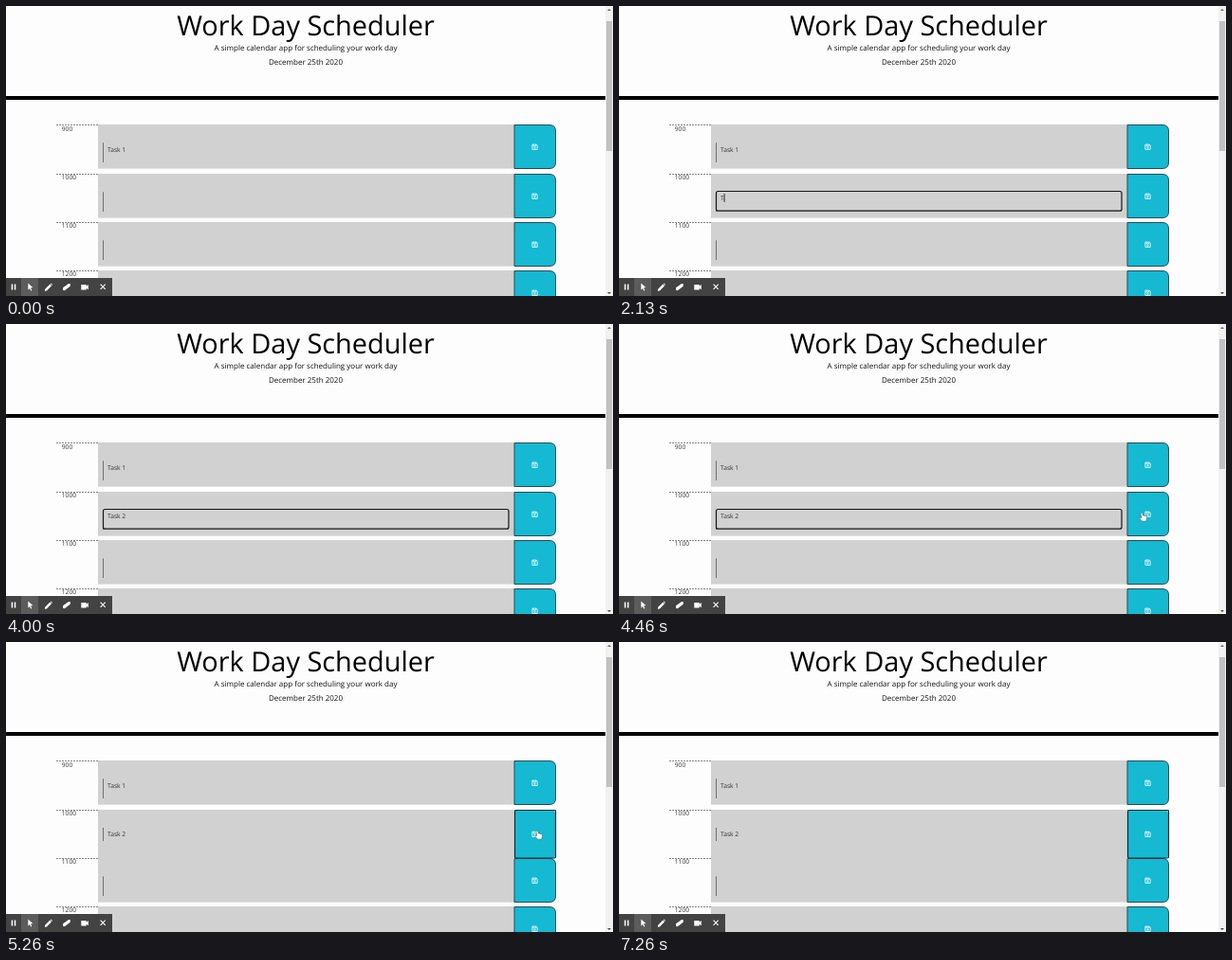
These frames come from a looping animation (640x306 px, 8 s). An HTML page:

```html
<!DOCTYPE html>
<html lang="en">
<head>
<meta charset="utf-8">
<title>Work Day Scheduler</title>
<style>
html, body { margin: 0; width: 100%; height: 100%; overflow: hidden; background: #fdfdfd; }
svg { position: absolute; left: 0; top: 0; display: block; }
text, .entry { font-family: "Open Sans", "Noto Sans", sans-serif; text-rendering: geometricPrecision; }
.small { font-size: 6.7px; fill: #333; }
.line { stroke: #707070; }

/* every animation shares one 8 s clock */
.anim { animation: 8s step-end infinite; }
.entry {
  position: absolute; left: 107px; top: 197px; height: 12px;
  box-sizing: content-box; overflow: hidden; white-space: pre;
  font-size: 6.7px; line-height: 12px; color: #333;
}
.entry { animation-name: type; }
.caret {
  position: absolute; left: 107px; top: 198px; width: 1px; height: 9px;
  background: #333; animation-name: caret-move, blink;
  animation-duration: 8s; animation-timing-function: step-end; animation-iteration-count: infinite;
}
.field { animation-name: field; }
.idle { animation-name: idle; }
.saved { animation-name: saved; }
.tap1 { animation-name: tap1; }
.tap2 { animation-name: tap2; }
.hand { animation-name: hand-show; }
.hand-path { animation: hand-move 8s linear infinite; }

@keyframes type {
  0% { width: 0; }
  26.625% { width: 3.7px; }
  28.25% { width: 7.1px; }
  30% { width: 10.3px; }
  31.625% { width: 13.9px; }
  43.25%, 100% { width: 24px; }
}
@keyframes caret-move {
  0% { transform: translateX(0); }
  26.625% { transform: translateX(3.6px); }
  28.25% { transform: translateX(7px); }
  30% { transform: translateX(10.2px); }
  31.625% { transform: translateX(13.4px); }
  34.125% { transform: translateX(14.9px); }
  43.25%, 100% { transform: translateX(19px); }
}
@keyframes blink {
  0% { opacity: 0; }
  14.125% { opacity: 1; }
  21.625% { opacity: 0; }
  26.625% { opacity: 1; }
  40% { opacity: 0; }
  43.25% { opacity: 1; }
  50% { opacity: 0; }
  56.25% { opacity: 1; }
  62.5%, 100% { opacity: 0; }
}
@keyframes field { 0% { opacity: 0; } 14.125% { opacity: 1; } 62.5%, 100% { opacity: 0; } }
@keyframes idle { 0% { opacity: 1; } 62.5%, 100% { opacity: 0; } }
@keyframes saved { 0% { opacity: 0; } 62.5%, 100% { opacity: 1; } }
@keyframes tap1 { 0% { opacity: 0; } 14.125% { opacity: 1; } 17.5%, 100% { opacity: 0; } }
@keyframes tap2 { 0% { opacity: 0; } 62.5% { opacity: 1; } 65.75%, 100% { opacity: 0; } }
@keyframes hand-show { 0% { opacity: 0; } 54.125% { opacity: 1; } 70%, 100% { opacity: 0; } }
@keyframes hand-move {
  0%, 54.125% { transform: translate(539px, 200px); }
  55.75% { transform: translate(551px, 199px); }
  57.5% { transform: translate(557px, 199px); }
  60%, 68.5% { transform: translate(560px, 199px); }
  70%, 100% { transform: translate(538px, 202px); }
}
</style>
</head>
<body>
<svg width="640" height="306" viewBox="0 0 640 306">
  <defs>
    <g id="icon" fill="none" stroke="#eafafd" stroke-width=".9">
      <path d="M-2.6-2.6H1.7L2.7-1.6V2.7H-2.6Z"/>
      <path d="M-1.4-2.4V-.8H1.2V-2.4"/>
      <circle cy="1" r=".7"/>
    </g>
    <path id="hour" d="M53 .5H97" stroke="#777" stroke-width=".9" stroke-dasharray="2 1"/>
    <g id="button">
      <path d="M536 .5H573Q579.5 .5 579.5 7V40Q579.5 46.5 573 46.5H536Z" fill="#15b9d2" stroke="#2c4a50"/>
      <use href="#icon" x="557.5" y="23.7"/>
    </g>
    <g id="row">
      <use href="#hour"/>
      <rect x="97" width="439" height="46.6" fill="#d1d1d1"/>
      <path class="line" d="M102.5 19.3V40"/>
      <use href="#button"/>
    </g>
    <circle id="tap" r="12.8" fill="none" stroke="#d4485a" stroke-width="1.7"/>
  </defs>

  <rect width="640" height="306" fill="#fdfdfd"/>
  <g text-anchor="middle" fill="#111">
    <text x="316" y="31" font-size="28.9" fill="#000">Work Day Scheduler</text>
    <text x="316" y="47" font-size="8">A simple calendar app for scheduling your work day</text>
    <text x="316" y="61.5" font-size="8">December 25th 2020</text>
  </g>
  <rect y="95" width="632" height="4" fill="#000"/>

  <use href="#row" y="125"/>
  <use href="#row" y="228"/>
  <use href="#row" y="279"/>
  <use href="#row" y="177" class="anim idle"/>

  <g class="anim saved">
    <use href="#hour" y="177"/>
    <rect x="97" y="177" width="439" height="52" fill="#d1d1d1"/>
    <path class="line" d="M102.5 196V210"/>
    <rect x="536" y="177" width="44" height="51" fill="#15b9d2"/>
    <path d="M577 177.5Q579.5 178 579.5 181M579.5 225Q579.5 228 577 228.5" fill="none" stroke="#d5f1f5"/>
    <rect x="536.5" y="177.5" width="43" height="50.5" rx="1.5" fill="none" stroke="#17282c" stroke-width="1.2"/>
    <use href="#icon" x="557.5" y="202.8"/>
  </g>

  <g class="small">
    <text x="58.8" y="131.5">900</text>
    <text x="58.8" y="183">1000</text>
    <text x="58.8" y="234">1100</text>
    <text x="58.8" y="285">1200</text>
    <text x="107" y="154.2">Task 1</text>
  </g>

  <rect class="anim field" x="102.5" y="195.5" width="427.5" height="20.7" rx="2" fill="#d1d1d1" stroke="#151515" stroke-width="1.2"/>
  <use href="#tap" x="138" y="202" class="anim tap1"/>
  <g class="anim hand"><g class="hand-path">
    <path d="M-.6 .7Q.4-.6 1.3 .6L2 3.2Q3.2 2.6 3.7 3.5Q4.8 3 5.2 4Q6.3 4 6.1 5.6L5.3 9.2H1.2L-1.6 6.2Q-1.5 4.9 .3 5.4Z" transform="translate(-.5 0)" fill="#fff" stroke="#29454b" stroke-width=".5"/>
  </g></g>
  <use href="#tap" x="561" y="201" class="anim tap2"/>

  <!-- scrollbar -->
  <rect x="632" width="8" height="306" fill="#f1f1f1"/>
  <rect x="633" y="16" width="6" height="137" fill="#c1c1c1"/>
  <path d="M634 5L636 3L638 5Z" fill="#666"/>
  <path d="M634 302L636 304L638 302Z" fill="#444"/>

  <!-- recorder toolbar -->
  <rect y="287" width="112" height="19" fill="#434343"/>
  <rect x="16" y="287" width="18" height="19" fill="#5c5c5c"/>
  <g fill="#fff">
    <path d="M5.7 293.5h1.5v6h-1.5zM8.8 293.5h1.5v6h-1.5z"/>
    <path d="M23.3 292.5L28.2 297.1L26 297.4L27.3 300L26.2 300.5L25 297.9L23.3 299.4Z"/>
    <path d="M41.2 298.7L46.3 293.6L48 295.3L42.9 300.4L40.8 300.8ZM46.8 293.1L47.5 292.6L49 294.1L48.5 294.8Z"/>
    <path d="M60 297.3L66 293L68 293.2L67.6 295.7L61.8 300.2L60 299.8Z"/>
    <path d="M79.3 294h5.4v1.7l2.1-1.6v5.2l-2.1-1.6v1.9h-5.4z"/>
  </g>
  <path d="M99.6 293.7L104.7 298.8M104.7 293.7L99.6 298.8" stroke="#fff" stroke-width="1.1"/>
</svg>
<div class="anim entry">Task 2</div>
<div class="caret"></div>
</body>
</html>
```
